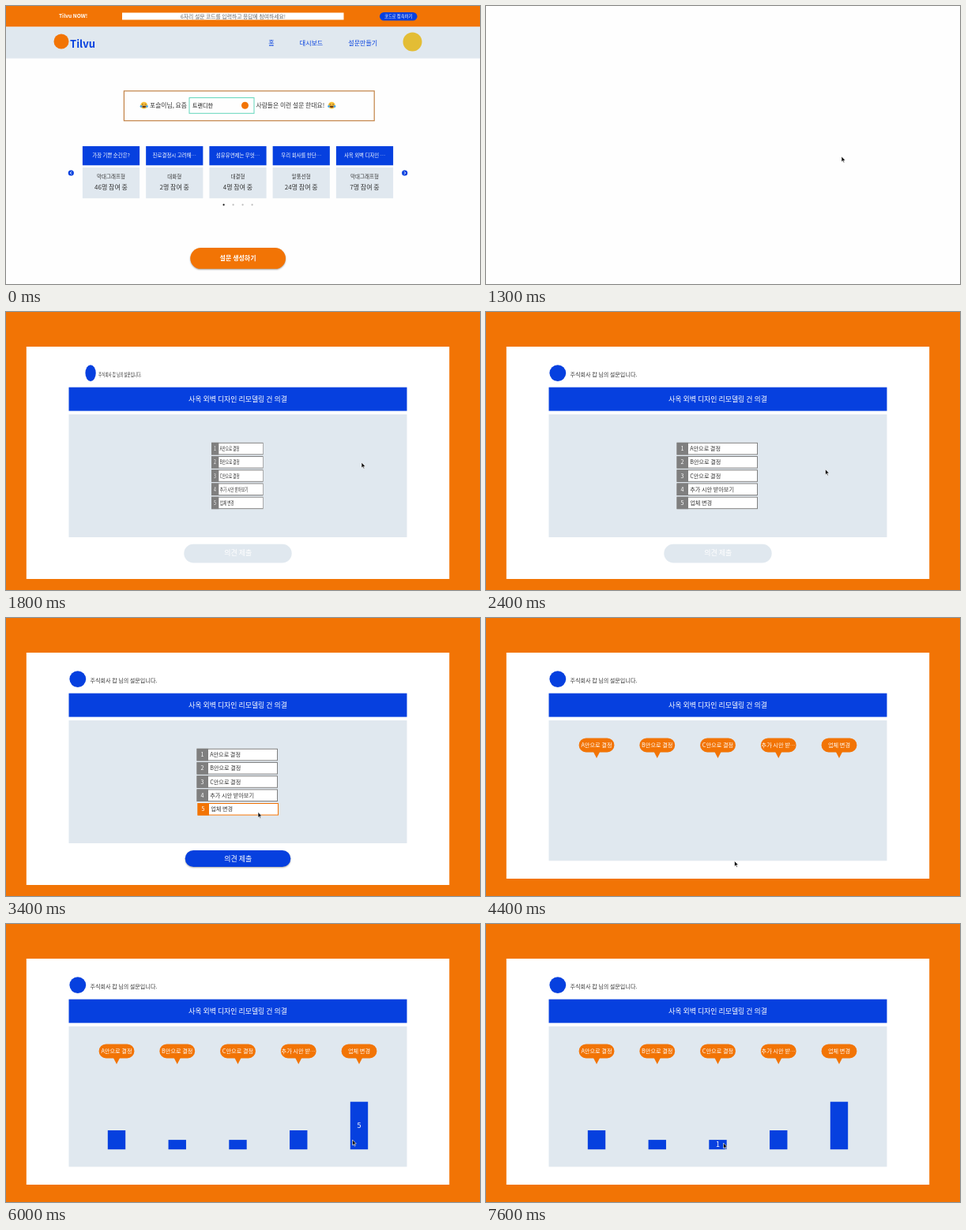
Animation, 600 px wide and 353 px high, one loop 8 s. Source, as an HTML page with a canvas:

```html
<!DOCTYPE html>
<html lang="ko">
<head>
<meta charset="utf-8">
<title>설문</title>
<style>
html, body { margin: 0; width: 100%; height: 100%; overflow: hidden; background: #fff; }
canvas { display: block; width: 600px; height: 353px; }
</style>
</head>
<body>
<canvas></canvas>
<script>
const LOOP = 8000, STEP = 100;
const ORANGE = '#f27405', BLUE = '#0640df', PALE = '#e0e8ef', INK = '#333';
const canvas = document.querySelector('canvas');
const ctx = canvas.getContext('2d');
const dpr = window.devicePixelRatio || 1;
canvas.width = 600 * dpr;
canvas.height = 353 * dpr;

const options = ['A안으로 결정', 'B안으로 결정', 'C안으로 결정', '추가 시안 받아보기', '업체 변경'];
const votes = [2, 1, 1, 2, 5];
const cards = [
  ['가장 기쁜 순간은?', '막대그래프형', 46],
  ['진로결정시 고려해…', '대화형', 2],
  ['섬유유연제는 무엇…', '대결형', 4],
  ['우리 회사를 한단…', '말풍선형', 24],
  ['사옥 외벽 디자인 …', '막대그래프형', 7],
];

// Pointer stops: time, x, y
const pointerPath = [
  [500, 457, 338], [900, 450, 191], [2200, 450, 191], [3000, 319, 246.5],
  [3600, 319, 246.5], [4100, 314.5, 308.5], [5200, 314.5, 308.5], [6000, 438.5, 274],
  [6200, 438.5, 274], [7000, 374.5, 272], [7200, 374.5, 272], [7400, 320, 276.5],
  [7500, 320, 276.5], [7600, 300.5, 278],
];

const progress = (t, start, end) => Math.min(1, Math.max(0, (t - start) / (end - start)));
const easeInOut = p => p * p * (3 - 2 * p);
const easeOut = p => 1 - (1 - p) ** 2;

function rect(x, y, w, h, fill) {
  ctx.fillStyle = fill;
  ctx.fillRect(x, y, w, h);
}

function frame(x, y, w, h, color, line = 1) {
  ctx.strokeStyle = color;
  ctx.lineWidth = line;
  ctx.strokeRect(x + line / 2, y + line / 2, w - line, h - line);
}

function pill(x, y, w, h, fill, shadow) {
  ctx.save();
  if (shadow) {
    ctx.shadowColor = 'rgba(0,0,0,.35)';
    ctx.shadowBlur = 2 * dpr;
    ctx.shadowOffsetY = dpr;
  }
  ctx.fillStyle = fill;
  ctx.beginPath();
  ctx.roundRect(x, y, w, h, h / 2);
  ctx.fill();
  ctx.restore();
}

function circle(x, y, r, fill) {
  ctx.fillStyle = fill;
  ctx.beginPath();
  ctx.arc(x, y, r, 0, 7);
  ctx.fill();
}

function polygon(points, fill) {
  ctx.fillStyle = fill;
  ctx.beginPath();
  points.forEach(p => ctx.lineTo(...p));
  ctx.closePath();
  ctx.fill();
}

// y is the vertical middle of the glyphs
function text(str, x, y, size, color, weight = 400, align = 'center') {
  ctx.font = `${weight} ${size}px "Noto Sans CJK KR", "Noto Sans CJK", sans-serif`;
  ctx.textAlign = align;
  ctx.fillStyle = color;
  ctx.fillText(str, x, y + size * 0.37);
}

function squeezed(centerX, scale, draw) {
  ctx.save();
  ctx.translate(centerX, 0);
  ctx.scale(scale, 1);
  ctx.translate(-centerX, 0);
  draw();
  ctx.restore();
}

function laughingFace(x, y) {
  circle(x, y, 4.4, '#fbc33c');
  ctx.fillStyle = '#6b3f1d';
  ctx.beginPath();
  ctx.arc(x, y + 0.5, 2.5, 0, Math.PI);
  ctx.fill();
  for (const side of [-1, 1]) {
    rect(x + side * 1.8 - 0.9, y - 1.7, 1.8, 0.8, '#6b3f1d');
    circle(x + side * 3.7, y + 1.3, 1.4, '#4aa8e8');
  }
}

function arrowButton(x, dir) {
  circle(x, 212, 3.6, BLUE);
  ctx.strokeStyle = '#fff';
  ctx.lineWidth = 1;
  ctx.beginPath();
  ctx.moveTo(x - dir * 0.8, 210.2);
  ctx.lineTo(x + dir, 212);
  ctx.lineTo(x - dir * 0.8, 213.8);
  ctx.stroke();
}

function drawHome() {
  rect(0, 0, 600, 26.5, ORANGE);
  text('Tilvu NOW!', 67, 13, 6.6, '#fff', 700, 'left');
  rect(147, 8.5, 280.5, 9, '#fff');
  text('6자리 설문 코드를 입력하고 응답에 참여하세요!', 287.5, 13, 6.83, '#666');
  pill(473, 8, 47.5, 10.5, BLUE);
  text('코드로 접속하기', 496.7, 13.2, 5.3, '#fff', 500);

  rect(0, 26.5, 600, 40, PALE);
  circle(70, 45, 9.5, ORANGE);
  text('Tilvu', 81, 48, 13, BLUE, 700, 'left');
  text('홈', 336, 47, 8, BLUE, 500);
  text('대시보드', 386.5, 47, 8, BLUE, 500);
  text('설문만들기', 451.7, 47, 8, BLUE, 500);
  circle(514.5, 45.5, 12, '#e3bd35');

  frame(148.8, 107.3, 318, 39, '#c28245', 1.2);
  laughingFace(174.7, 126.2);
  text('포슬이님, 요즘', 182, 126, 7.8, INK, 400, 'left');
  frame(231.5, 116, 83, 20.8, '#62d6bb');
  text('트랜디한', 236, 126.3, 7.1, '#111', 500, 'left');
  circle(302.5, 126.3, 4.5, ORANGE);
  text('사람들은 이런 설문 한대요!', 316.5, 126, 7.8, INK, 400, 'left');
  laughingFace(412.3, 126.2);

  cards.forEach(([title, kind, count], i) => {
    const x = 96.9 + i * 80.25, mid = x + 36.1;
    rect(x, 178, 72.2, 24.3, BLUE);
    text(title, mid, 190, 6.45, '#fff', 500);
    rect(x, 205, 72.2, 39.2, PALE);
    text(kind, mid, 216.5, 6.5, INK);
    text(`${count}명 참여 중`, mid, 230.5, 8, INK);
  });
  arrowButton(82.3, -1);
  arrowButton(504.7, 1);
  for (let i = 0; i < 4; i++) circle(275.6 + i * 12, 252.4, 1.1, i ? '#bbb' : '#111');

  pill(233.3, 307, 120.7, 26.8, ORANGE, true);
  text('설문 생성하기', 293.6, 320.3, 8, '#fff', 700);
}

function drawSurveyPage(cardBottom, panelBottom, headScale) {
  rect(0, 0, 600, 353, ORANGE);
  rect(25.8, 44, 535.4, cardBottom - 44, '#fff');
  squeezed(136, headScale, () => {
    circle(90.8, 77.6, 10.4, BLUE);
    text('주식회사 캅 님의 설문입니다.', 106.5, 79.2, 7.08, INK, 400, 'left');
  });
  rect(79.5, 95.6, 428, 30, BLUE);
  text('사옥 외벽 디자인 리모델링 건 의결', 293.5, 110.6, 8.93, '#fff');
  rect(79.5, 130, 428, panelBottom - 130, PALE);
}

function drawForm(t, pointer) {
  const scale = easeOut(progress(t, 1600, 2100));
  const chosen = t >= 3400;
  drawSurveyPage(339, 286, scale);
  squeezed(293, scale, () => options.forEach((label, i) => {
    const top = 165.8 + i * 17.2;
    const hovered = pointer.x > 241 && pointer.x < 345 && pointer.y > top && pointer.y < top + 15.5;
    const shift = hovered ? 1 : 0;
    const x = 241.5 + shift, y = top + shift * 0.4;
    const color = chosen && i === 4 ? ORANGE : '#7f7f7f';
    rect(x, y, 102.5, 15.6, '#fff');
    frame(x, y, 102.5, 15.6, color);
    rect(x, y, 14.5, 15.6, color);
    text(i + 1, x + 7, y + 7.8, 7.1, '#fff');
    text(label, x + 16.7, y + 7.8, 7.15, INK, 400, 'left');
  }));
  if (chosen) pill(226.7, 295, 133.6, 21, BLUE, true);
  else pill(225.3, 294.8, 136.4, 23.6, PALE);
  text('의견 제출', 293.7, 305.7, 9, '#fff', 500);
}

function drawResults(t, pointer) {
  drawSurveyPage(331, 308.3, 1);
  const grow = easeInOut(progress(t, 4400, 5500));
  options.forEach((label, i) => {
    const x = 140 + i * 76.75;
    pill(x - 22.4, 152.4, 44.8, 18, ORANGE);
    polygon([[x - 4.2, 169.8], [x + 4.2, 169.8], [x, 178]], ORANGE);
    text(i === 3 ? '추가 시안 받…' : label, x, 161.2, 7.2, '#fff');

    const height = votes[i] * 12.1 * grow, top = 286.2 - height;
    rect(x - 11.2, top, 22.4, height, BLUE);
    if (Math.abs(pointer.x - x) < 11.2 && pointer.y > top && pointer.y < 286.2) {
      text(votes[i], x, 286.2 - height / 2, 9, '#fff');
    }
  });
}

function pointerAt(t) {
  const next = pointerPath.findIndex(stop => stop[0] > t);
  if (next === 0) return { x: pointerPath[0][1], y: pointerPath[0][2] };
  const [t1, x1, y1] = pointerPath.at(next < 0 ? -1 : next);
  const [t0, x0, y0] = pointerPath.at(next < 0 ? -1 : next - 1);
  const p = t1 > t0 ? easeInOut(progress(t, t0, t1)) : 1;
  return { x: x0 + (x1 - x0) * p, y: y0 + (y1 - y0) * p };
}

function drawPointer({ x, y }) {
  const shape = [[0, 0], [0, 7], [1.6, 5.6], [2.7, 8.1], [3.8, 7.6], [2.7, 5.2], [4.9, 5]];
  polygon(shape.map(([dx, dy]) => [x + dx, y + dy]), '#111');
  ctx.strokeStyle = '#fff';
  ctx.lineWidth = 0.6;
  ctx.stroke();
}

function draw(now) {
  const t = Math.floor((now % LOOP) / STEP) * STEP;
  const pointer = pointerAt(t);
  ctx.setTransform(dpr, 0, 0, dpr, 0, 0);
  rect(0, 0, 600, 353, '#fefefe');
  if (t < 1300) drawHome();
  else if (t >= 4400) drawResults(t, pointer);
  else if (t >= 1600) drawForm(t, pointer);
  if (t >= 400) drawPointer(pointer);
}

const start = performance.now();
function tick() {
  draw(performance.now() - start);
  requestAnimationFrame(tick);
}
tick();
</script>
</body>
</html>
```
